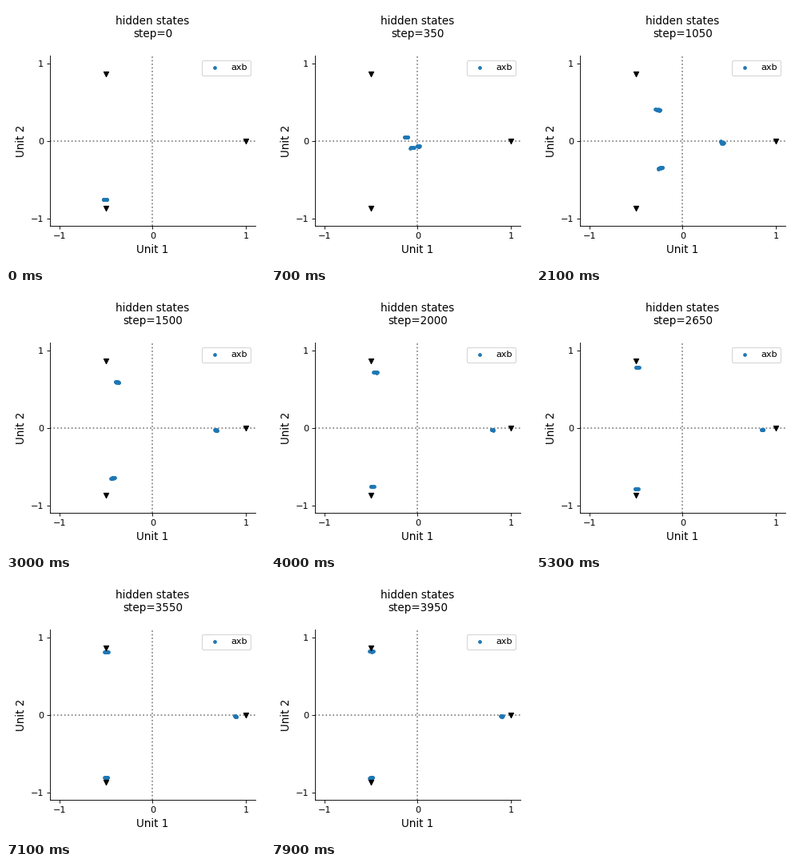
A matplotlib script that plays this animation: 324x324 px, repeating every 8000 ms.

```python
import numpy as np
import matplotlib.pyplot as plt
from matplotlib.animation import FuncAnimation

plt.rcParams["font.family"] = "DejaVu Sans"
FRAMES, INTERVAL, STEP = 80, 100, 50
PER_CLUSTER = 9
START = np.array([-.51, -.755])
ANGLES = np.arange(3) * 2 * np.pi / 3

# Per cluster: right, top left, bottom left.
RATE = np.array([1.75, 1.15, 2.2])     # steepness of the separation
ONSET = np.array([1.87, 1.9, 2.1])     # its midpoint in seconds
LAG = np.array([.88, .33, .4])         # slow final approach
LEAN = np.radians([-9, 11, -14])       # angular error that fades
WIDTH = np.array([.010, .019, .017])
TILT = np.array([-1, -1, 1])

rng = np.random.default_rng(4)
along = np.linspace(-1, 1, PER_CLUSTER)
across = rng.uniform(-1, 1, (3, PER_CLUSTER))


def centres(t):
    """Collapse to the origin, then grow towards the three goals."""
    radius = t / (t + LAG) / (1 + np.exp(-RATE * (t - ONSET)))
    angle = ANGLES + LEAN / (t + 1)
    out = radius * np.array([np.cos(angle), np.sin(angle)])
    return out.T + START * np.exp(-t / .28)


def points(t):
    pulse = np.exp(-((t - 1.9) / .9) ** 2)
    sx = (WIDTH + .008 * pulse)[:, None]
    sy = .004 + .015 * pulse
    c = centres(t)
    x = c[:, :1] + sx * along
    y = c[:, 1:] + sy * (.5 * TILT[:, None] * along + .5 * across)
    return np.column_stack([x.ravel(), y.ravel()])


def title(step):
    return f"hidden states\nstep={step}\n"


fig, ax = plt.subplots(figsize=(4, 4), dpi=81)
ax.axhline(0, color="gray", ls=":", zorder=0)
ax.axvline(0, color="gray", ls=":", zorder=0)
dots = ax.scatter(*points(0).T, s=10, color="tab:blue", label="axb")
ax.scatter(np.cos(ANGLES), np.sin(ANGLES), s=30, color="black", marker="v")

ax.set(xlim=(-1.1, 1.1), ylim=(-1.1, 1.1),
       xticks=[-1, 0, 1], yticks=[-1, 0, 1])
ax.set_xlabel("Unit 1", fontsize=12)
ax.set_ylabel("Unit 2", fontsize=12)
ax.spines[["top", "right"]].set_visible(False)
ax.legend(loc="upper right")
heading = ax.set_title(title(0), fontsize=12)
fig.tight_layout()


def update(i):
    dots.set_offsets(points(i * INTERVAL / 1000))
    heading.set_text(title(i * STEP))
    return dots, heading


anim = FuncAnimation(fig, update, frames=FRAMES, interval=INTERVAL,
                     repeat=True, blit=False)
plt.show()
```
